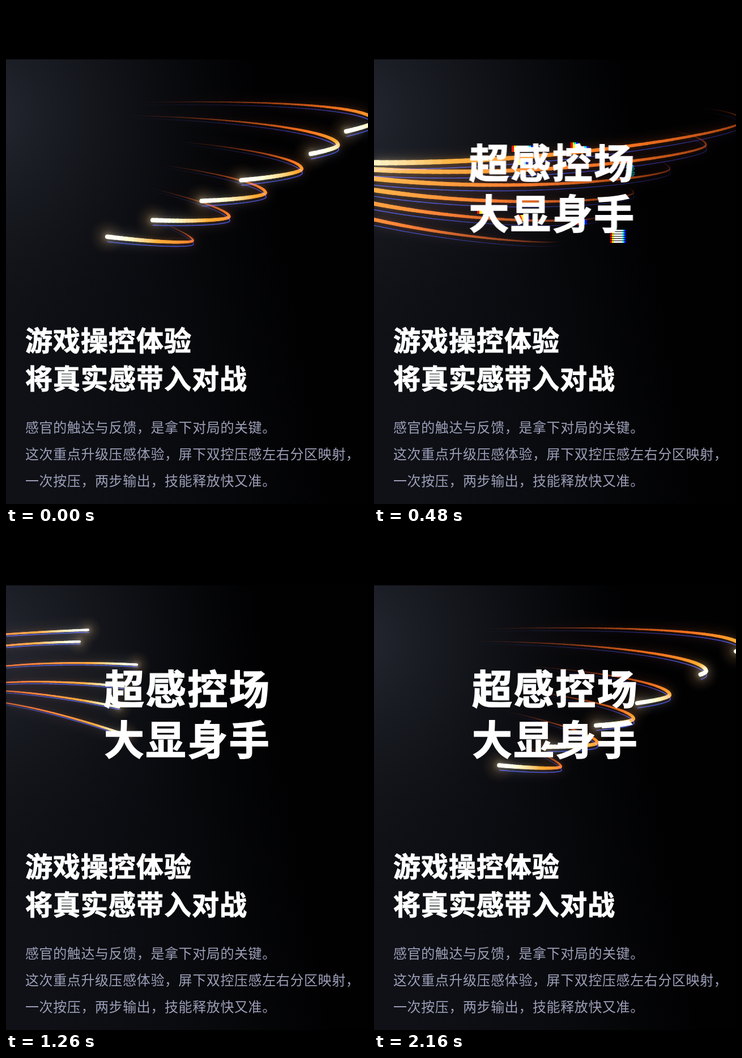
These frames come from a looping animation (639 by 877 pixels, 2220 ms). An HTML page with a canvas:

```html
<!DOCTYPE html>
<html lang="zh-CN">
<head>
<meta charset="utf-8">
<style>
  html, body { margin: 0; width: 100%; height: 100%; overflow: hidden; background: #000; }
  canvas, svg { position: absolute; left: 0; top: 0; display: block; }
  text { font-family: "Noto Sans CJK SC", "Noto Sans CJK", "Noto Sans CJK JP", sans-serif; }
  .head { font-size: 48px; font-weight: 900; letter-spacing: 1px; fill: #fff; stroke: #fff; stroke-width: 1px; }
  .body { font-size: 24px; font-weight: 300; letter-spacing: .6px; fill: #9c9fb8; }
</style>
</head>
<body>
<canvas id="stage" width="639" height="877"></canvas>
<svg width="639" height="877">
  <g class="head">
    <text x="34" y="607">游戏操控体验</text>
    <text x="34" y="674">将真实感带入对战</text>
  </g>
  <g class="body">
    <text x="34" y="751">感官的触达与反馈，是拿下对局的关键。</text>
    <text x="34" y="798">这次重点升级压感体验，屏下双控压感左右分区映射，</text>
    <text x="34" y="845">一次按压，两步输出，技能释放快又准。</text>
  </g>
</svg>
<script>
const W = 639, H = 877, LOOP = 2220, LAG = 830, TOP = 94;
const RGB = ['#f00', '#0f0', '#00f'];
const ctx = document.getElementById('stage').getContext('2d');
const clamp = v => Math.min(1, Math.max(0, v));

function layer() {
  const c = document.createElement('canvas');
  c.width = W;
  c.height = H;
  return c.getContext('2d');
}

function random(seed) {
  let s = seed * 7919 + 17;
  return () => {
    s = (s + 0x6D2B79F5) | 0;
    let x = Math.imul(s ^ (s >>> 15), 1 | s);
    x ^= x + Math.imul(x ^ (x >>> 7), 61 | x);
    return ((x ^ (x >>> 14)) >>> 0) / 4294967296;
  };
}

function bezier(p, u) {
  const v = 1 - u;
  return [0, 1].map(a =>
    v * v * v * p[0][a] + 3 * u * v * v * p[1][a] + 3 * u * u * v * p[2][a] + u * u * u * p[3][a]);
}

// Each trail enters at the left, turns at its tip and sweeps back out in front
function makeTrail(y, bow, enter, turn, exit, easeIn, easeOut, k) {
  const x = 650 - 64 * k, tipY = 203 + 42 * k, tip = [x, tipY];
  const back = [[0, y], [.4 * x, y + bow], [x, tipY - 40 + 4.5 * k], tip];
  const front = [tip, [x, tipY + 18 - 2 * k], [.5 * x, 278 + 27 * k], [0, 276 + 10 * k + 2 * k * k]];
  const at = t => t < turn
    ? bezier(back, Math.pow(clamp((t - enter) / (turn - enter)), easeIn))
    : bezier(front, Math.pow((t - turn) / (exit - turn), easeOut));
  return { enter, end: exit + 60, at };
}

const trails = [
  [180, -18, 1000, 2115, 2640, 1.2, .9],
  [200, -22, 1000, 2120, 2600, 1.2, .9],
  [236, -20, 870, 2025, 2570, 1, .9],
  [265, -10, 870, 2000, 2550, 1, .9],
  [280, 10, 820, 1960, 2490, 1, .9],
  [301, 21, 800, 1800, 2425, .9, 1.2]
].map((row, k) => makeTrail(...row, k));

// Lines grow thicker as they come nearer
const nearness = t => Math.pow(clamp((t - 1000) / 1700), 1.5);
const thickness = t => 3.2 + 6.5 * nearness(t);
const rgb = (...c) => `rgb(${c.map(v => Math.round(255 * clamp(v))).join()})`;

function heat(s) {
  const white = clamp((s - .84) / .14);
  return rgb(1.6 * s, .75 * Math.pow(s, 1.2) + .35 * white, .15 * s + .8 * white);
}

const light = layer();
light.lineCap = 'round';

function line(a, b, dx, dy, width, color) {
  light.lineWidth = width;
  light.strokeStyle = color;
  light.beginPath();
  light.moveTo(a[0] + dx, a[1] + dy);
  light.lineTo(b[0] + dx, b[1] + dy);
  light.stroke();
}

function drawTrail({ enter, end, at }, now) {
  const from = Math.max(now - LAG, enter), to = Math.min(now, end), n = 90;
  if (to <= from) return;
  let last = at(from);
  for (let i = 1; i <= n; i++) {
    const t = from + (to - from) * i / n, point = at(t);
    const s = 1 - (now - t) / LAG, blue = clamp(s * 1.4);
    line(last, point, 1, 3.5 + 9 * nearness(t), .6 + blue, rgb(.17 * blue, .23 * blue, .74 * blue));
    line(last, point, 0, 0, .6 + thickness(t) * Math.pow(s, .9), heat(s));
    last = point;
  }
}

function drawHalo({ enter, end, at }, now) {
  if (now < enter || now > end) return;
  const [x, y] = at(now), r = 18 + thickness(now) * 2;
  const g = ctx.createRadialGradient(x, y, 0, x, y, r);
  g.addColorStop(0, 'rgba(255,215,140,.3)');
  g.addColorStop(.45, 'rgba(220,160,80,.1)');
  g.addColorStop(1, 'rgba(160,90,30,0)');
  ctx.fillStyle = g;
  ctx.fillRect(x - r, y - r, 2 * r, 2 * r);
}

function glow(blur, alpha) {
  ctx.filter = blur ? `blur(${blur}px)` : 'none';
  ctx.globalAlpha = alpha;
  ctx.drawImage(light.canvas, 0, 0);
}

function drawLights(t) {
  light.globalCompositeOperation = 'source-over';
  light.fillStyle = '#000';
  light.fillRect(0, 0, W, H);
  light.globalCompositeOperation = 'lighten';
  const ages = [t, t + LOOP];
  for (const age of ages) trails.forEach(p => drawTrail(p, age));
  ctx.globalCompositeOperation = 'screen';
  glow(10, .4);
  glow(3, .2);
  glow(0, 1);
  for (const age of ages) trails.forEach(p => drawHalo(p, age));
}

function makeBackdrop() {
  const b = layer();
  b.fillStyle = '#000';
  b.fillRect(0, 0, W, H);
  const base = b.createLinearGradient(0, 480, 490, 398);
  base.addColorStop(0, '#0f1116');
  base.addColorStop(.5, '#0a0b0f');
  base.addColorStop(1, '#010102');
  b.fillStyle = base;
  b.fillRect(0, TOP, W, H - TOP);
  const haze = b.createRadialGradient(-40, 190, 0, -40, 190, 460);
  haze.addColorStop(0, 'rgba(40,43,54,.9)');
  haze.addColorStop(.4, 'rgba(27,30,37,.6)');
  haze.addColorStop(1, 'rgba(10,11,15,0)');
  b.fillStyle = haze;
  b.fillRect(0, TOP, W, H - TOP);
  return b.canvas;
}

function makeTitle(color) {
  const c = layer();
  c.font = '900 71px "Noto Sans CJK SC", "Noto Sans CJK", "Noto Sans CJK JP", sans-serif';
  c.letterSpacing = '2.6px';
  c.fillStyle = c.strokeStyle = color;
  c.lineWidth = 1.4;
  ['超感控场', '大显身手'].forEach((words, i) => {
    c.fillText(words, 173, 303 + 89 * i);
    c.strokeText(words, 173, 303 + 89 * i);
  });
  return c.canvas;
}

const backdrop = makeBackdrop();
const title = makeTitle('#fff');
const channels = RGB.map(makeTitle);

function slice(x, y, w, h, dx, dy, split) {
  channels.forEach((img, i) => {
    ctx.drawImage(img, x, y, w, h, x + dx + (i - 1) * split, y + dy, w, h);
  });
}

function drawFragments(rnd, shift) {
  for (let i = 0; i < 7; i++) {
    const x = 175 + rnd() * 265, y = 240 + rnd() * 145;
    slice(x, y, 14 + rnd() * 22, 5 + rnd() * 13, shift + (rnd() - .5) * 24, (rnd() - .5) * 10, 4);
  }
  ctx.fillStyle = 'rgba(0,190,200,.6)';
  for (let y = 280; y < 300; y += 3) ctx.fillRect(444 + rnd() * 3, y, 14, 2);
  RGB.forEach((color, i) => {
    ctx.fillStyle = color;
    for (let y = 394; y < 418; y += 4) ctx.fillRect(417 + i * 3, y, 22, 3);
  });
}

// The title swings in with split colours, then settles
function drawTitle(t) {
  if (t < 60) return;
  ctx.globalCompositeOperation = 'source-over';
  if (t >= 570) {
    ctx.drawImage(title, 0, 0);
    return;
  }
  const age = t - 60, rnd = random(t / 30);
  const shift = 36 * Math.exp(-age / 260) * Math.cos(age / 170);
  const force = Math.pow(clamp(1 - age / 420), 3);
  if (!force) ctx.drawImage(title, shift, 0);
  ctx.globalCompositeOperation = 'lighter';
  if (force) {
    for (let y = 236; y < 404; y += 4) slice(0, y, W, 4, shift + (rnd() - .5) * 14 * force, 0, 16 * force);
  }
  if (t >= 240) drawFragments(rnd, shift);
}

function render(t) {
  ctx.globalCompositeOperation = 'source-over';
  ctx.drawImage(backdrop, 0, 0);
  drawLights(t);
  drawTitle(t);
}

// Steps of 30 ms, the first of every 180 ms held twice as long
function stepTime(t) {
  const p = t % 180;
  return t - p + (p < 60 ? 0 : Math.floor(p / 30) * 30);
}

const begin = performance.now();
let shown = -1;
function tick() {
  const t = stepTime(Math.floor(performance.now() - begin) % LOOP);
  if (t !== shown) render(shown = t);
  requestAnimationFrame(tick);
}
tick();
</script>
</body>
</html>
```
